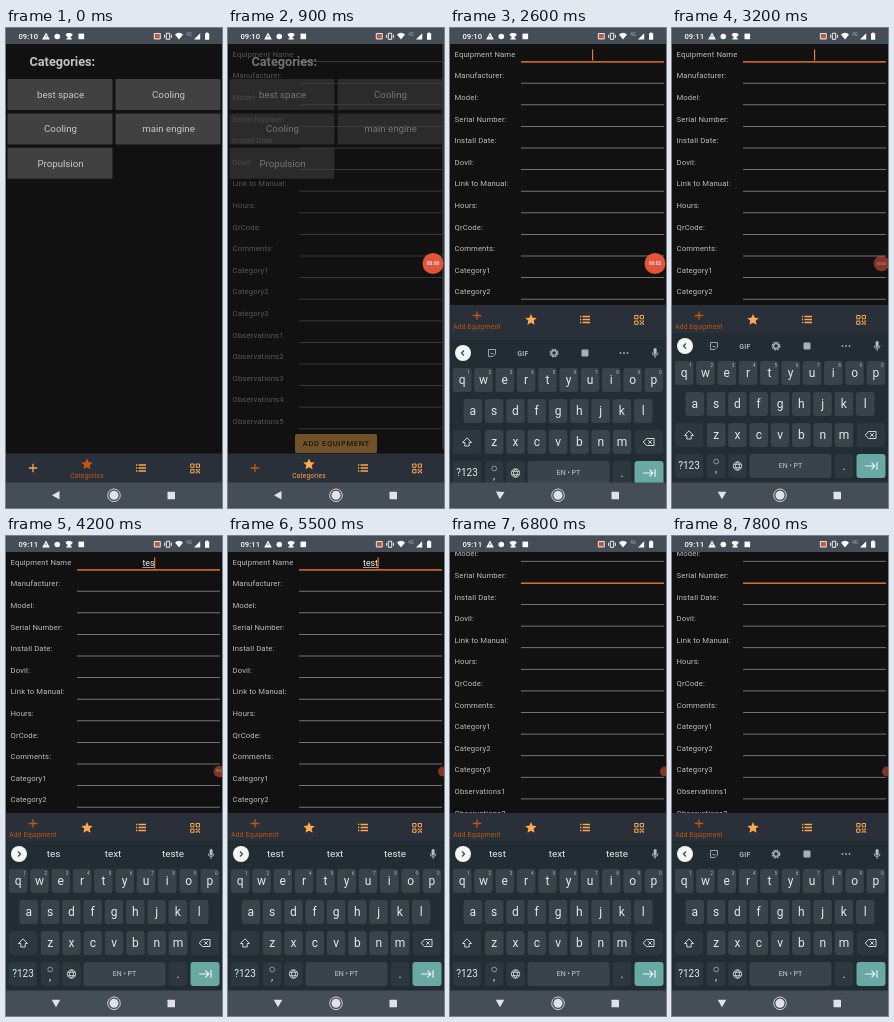
Animation, 216 px wide and 480 px high, one loop 8000 ms. Source, as an HTML page:

```html
<!DOCTYPE html>
<html lang="en">
<head>
<meta charset="utf-8">
<title>Equipment form</title>
<style>
html, body { margin: 0; width: 100%; height: 100%; overflow: hidden; background: #111; }
svg { display: block; width: 100vw; height: 100vh; font-family: Roboto, sans-serif; }
</style>
</head>
<body>
<svg id="stage" viewBox="0 0 216 480"></svg>
<script>
const LOOP = 8000, STEP = 100;
const BG = '#111', AMBER = '#ffa84d', RUST = '#c4560f', FOCUS = '#e87a35', BAR = '#454e56';
const ROW = 21.6, SCROLL_END = 51.5, KEYBOARD_SHIFT = 148.5;
const stage = document.getElementById('stage');

function add(parent, tag, attrs = {}, content) {
  const node = document.createElementNS('http://www.w3.org/2000/svg', tag);
  set(node, attrs);
  if (content !== undefined) node.textContent = content;
  parent.append(node);
  return node;
}
function set(node, attrs) {
  for (const name in attrs) node.setAttribute(name, attrs[name]);
}
const group = (parent = stage, attrs) => add(parent, 'g', attrs);
const rect = (parent, x, y, width, height, fill, rx = 0) =>
  add(parent, 'rect', { x, y, width, height, fill, rx });
const circle = (parent, cx, cy, r, fill) => add(parent, 'circle', { cx, cy, r, fill });
const fillPath = (parent, d, fill) => add(parent, 'path', { d, fill });
const linePath = (parent, d, stroke, width = 1) =>
  add(parent, 'path', { d, stroke, fill: 'none', 'stroke-width': width });
const text = (parent, x, y, size, fill, content, extra = {}) =>
  add(parent, 'text', { x, y, fill, 'font-size': size, ...extra }, content);
const centred = (parent, x, y, size, fill, content, extra = {}) =>
  text(parent, x, y, size, fill, content, { 'text-anchor': 'middle', ...extra });
const moveTo = (node, x, y) => set(node, { transform: `translate(${x} ${y})` });
const show = (node, visible) => set(node, { opacity: +visible });
const ramp = (t, from, to) => Math.min(1, Math.max(0, (t - from) / (to - from)));

rect(stage, 0, 0, 216, 480, BG);

// Equipment form
const form = group();
const sheet = group(form);
const labels = ['Equipment Name', 'Manufacturer:', 'Model:', 'Serial Number:', 'Install Date:',
  'Dovil:', 'Link to Manual:', 'Hours:', 'QrCode:', 'Comments:',
  ...[1, 2, 3].map(n => 'Category' + n), ...[1, 2, 3, 4, 5].map(n => 'Observations' + n)];
const underlines = labels.map((label, i) => {
  text(sheet, 4.5, 28.7 + i * ROW, 7.7, '#bdbdbd', label, { 'letter-spacing': .13 });
  return rect(sheet, 71, 33.2 + i * ROW, 143, .8, '#8c8c8c');
});
rect(sheet, 67, 406, 82, 19, '#ffb14f', 2);
centred(sheet, 108.3, 418.3, 7.7, '#2d2010', 'ADD EQUIPMENT', { 'font-weight': 500, 'letter-spacing': .55 });
const typed = centred(sheet, 142.5, 29.8, 8.8, '#f2f2f2', '');
const typedLine = rect(sheet, 135, 31, 0, .7, '#ddd');
const cursor = rect(sheet, 142, 21.5, 1.2, 11, FOCUS);
const scrollbar = rect(form, 214, 16, 2, 400, '#666');

// Category list
const categories = group();
text(categories, 23.5, 37.5, 12.7, '#c4c4c4', 'Categories:', { 'font-weight': 700 });
['best space', 'Cooling', 'Cooling', 'main engine', 'Propulsion'].forEach((name, i) => {
  const x = 1.5 + i % 2 * 108, y = 51 + Math.floor(i / 2) * 34.4;
  rect(categories, x, y, 105, 31, '#414141', 1);
  centred(categories, x + 53, y + 18.9, 9.7, '#c8c8c8', name);
});

// Tabs
const tabs = group();
rect(tabs, 0, 425.5, 216, 180, '#2a303a');
const plus = linePath(group(tabs), 'M22.8 440H31.2M27 435.8V444.2', AMBER, 1.3);
const star = fillPath(group(tabs),
  'M81 434.5l1.7 3.7 4 .4-3 2.7.9 4-3.6-2.1-3.6 2.1.9-4-3-2.7 4-.4z', AMBER);
linePath(tabs, 'M132.5 437H140M132.5 440H140M132.5 443H140', AMBER, 1.3);
linePath(tabs, 'M130 437h1.3M130 440h1.3M130 443h1.3', AMBER, 1.3);
linePath(tabs, 'M184.7 436h3.3v3.3h-3.3zM190.2 436h3.3v3.3h-3.3zM184.7 441.5h3.3v3.3h-3.3z', AMBER);
fillPath(tabs, 'M189.7 441h1.5v1.5h-1.5zM192.5 441h1.5v1.5h-1.5zM191.2 442.5h1.4v1.4h-1.4zM189.7 443.8h1.5v1.5h-1.5zM192.5 443.8h1.5v1.5h-1.5z', AMBER);
const tabLabel = (x, name) => centred(tabs, x, 449.6, 6.6, RUST, name, { 'letter-spacing': .2 });
const addLabel = tabLabel(27, 'Add Equipment');
const categoriesLabel = tabLabel(81, 'Categories');

// Keyboard
const INK = '#e4e9eb', KEY = '#39444a', FUNCTION_KEY = '#2c383e', PRESSED = '#566269';
const keyboard = group();
rect(keyboard, 0, 305, 216, 175, '#222d33');
circle(keyboard, 13, 318, 8, '#f4f6f6');
const chevron = linePath(keyboard, '', '#37444a', 1.2);
fillPath(keyboard, 'M203.6 314.4a1.5 1.5 0 0 1 3 0v3.6a1.5 1.5 0 0 1-3 0z', '#b4bfc4');
linePath(keyboard, 'M202.2 317.6a2.9 2.9 0 0 0 5.8 0M205.1 320.6v2.4', '#b4bfc4', .9);

const tools = group(keyboard);
const TOOL = '#a5b1b6';
linePath(tools, 'M38.5 314.5h7v4.5l-2.5 2.5h-4.5zM40.5 318.2q1.5 1.6 3 0', TOOL, .9);
centred(tools, 73, 320.5, 7, TOOL, 'GIF', { 'font-weight': 700, 'letter-spacing': .2 });
add(tools, 'circle', { cx: 104, cy: 318, r: 3.5, fill: 'none', stroke: TOOL,
  'stroke-width': 1.8, 'stroke-dasharray': '1.9 .85' });
add(tools, 'circle', { cx: 104, cy: 318, r: 2.4, fill: 'none', stroke: TOOL, 'stroke-width': 1.3 });
rect(tools, 131.5, 314.5, 7, 7, TOOL, 1);
[170.5, 174, 177.5].forEach(x => circle(tools, x, 318, .9, TOOL));

const suggestions = group(keyboard);
const words = [47.5, 107, 167].map(x => centred(suggestions, x, 321.3, 9.9, INK, ''));

const keys = {};
function addKey(label, cx, cy, width, fill = KEY, size = 12) {
  const key = rect(keyboard, cx - width / 2, cy - 12, width, 24, fill, 3);
  if (label) {
    keys[label] = key;
    centred(keyboard, cx, cy + size * .33, size, INK, label);
  }
}
[['qwertyuiop', 12.2, 345], ['asdfghjkl', 22.8, 376], ['zxcvbnm', 44.2, 407]].forEach(([row, x, y], r) =>
  [...row].forEach((letter, i) => {
    const cx = x + i * 21.3;
    addKey(letter, cx, y, 18.6);
    if (r === 0) centred(keyboard, cx + 6.3, y - 6.2, 4.6, '#b4bfc4', (i + 1) % 10);
  }));
addKey('', 17, 407, 28, FUNCTION_KEY);
linePath(keyboard, 'M17 402.8l-4.5 4.7h2.3v3.5h4.4v-3.5h2.3z', INK, .9);
addKey('', 199, 407, 28, FUNCTION_KEY);
linePath(keyboard, 'M196.5 403.5h7.5v7h-7.5l-3.2-3.5zM198.2 405.2l3.6 3.6M201.8 405.2l-3.6 3.6', INK, .9);
addKey('?123', 17, 438, 28, FUNCTION_KEY, 10);
addKey('', 44.2, 438, 18.6, FUNCTION_KEY);
add(keyboard, 'circle', { cx: 44.2, cy: 433.5, r: 2.4, fill: 'none', stroke: '#b4bfc4', 'stroke-width': .7 });
centred(keyboard, 44.2, 444, 11, INK, ',');
addKey('', 65.5, 438, 18.6, FUNCTION_KEY);
linePath(keyboard, 'M61.3 438a4.2 4.2 0 1 0 8.4 0a4.2 4.2 0 1 0-8.4 0M61.8 436.3h7.4M61.8 439.7h7.4M65.5 433.8q-4 4.2 0 8.4q4-4.2 0-8.4', INK, .8);
addKey('', 118.5, 438, 82);
centred(keyboard, 118.5, 440.4, 7, '#c3cdd1', 'EN • PT');
addKey('.', 172, 438, 18.6, FUNCTION_KEY);
addKey('', 199, 438, 29, '#6aa9a3');
linePath(keyboard, 'M193 438h9.5M199.5 434.7l3.3 3.3-3.3 3.3M205 434.3v7.4', '#eef6f5', 1.2);

// System bars
rect(stage, 0, 454.5, 216, 25.5, BAR);
const back = fillPath(stage, 'M46 467.3L53.5 463V471.6z', '#dfe3e5');
add(stage, 'circle', { cx: 108, cy: 467.3, r: 6.3, fill: 'none', stroke: '#dfe3e5', 'stroke-width': .9 });
circle(stage, 108, 467.3, 4.5, '#dfe3e5');
rect(stage, 161.5, 463.8, 7.5, 7.5, '#dfe3e5', .5);

rect(stage, 0, 0, 216, 16, BAR);
const clock = text(stage, 12.5, 11, 7.7, '#fff', '', { 'font-weight': 500 });
fillPath(stage, 'M40 4.5l3.8 7h-7.6z', '#fff');
rect(stage, 39.6, 7.2, .8, 2.3, BAR);
circle(stage, 51.3, 8.5, 2.8, '#fff');
fillPath(stage, 'M61 5h4.2v.8h1.4q0 2.8-2 3v1.5h1.2v1.2h-5.4v-1.2h1.2V8.8q-2-.2-2-3H61z', '#fff');
rect(stage, 72.5, 5.6, 5.6, 5.6, '#fff');
rect(stage, 147.8, 5, 7, 6.4, '#e9dedb', .8);
rect(stage, 148.8, 6, 5, 4.4, '#b45a4b');
linePath(stage, 'M160.3 5.3h3.4v6h-3.4zM158.6 6.7v3.2M165.4 6.7v3.2', '#fff', .9);
fillPath(stage, 'M169 6.5q4-3.3 8 0l-4 5z', '#fff');
centred(stage, 183, 8.2, 4.6, '#a9b0b5', '4G');
fillPath(stage, 'M188 11.5h6.2V5.2z', '#fff');
fillPath(stage, 'M199 5.3h1.2v-.9h1.8v.9h1.2v6.5H199z', '#fff');

// Floating timer
const bubble = group();
circle(bubble, 0, 0, 10.5, '#e5533a');
const timer = centred(bubble, 0, 1.7, 5, '#fff', '', { 'font-weight': 500 });

function typedAt(t) {
  return 'test'.slice(0, t < 3700 ? 0 : Math.min(4, Math.floor((t - 3700) / 200) + 1));
}

function cursorVisible(t) {
  if (t < 2300) return false;
  if (t < 5900) return t < 4900 || t >= 5400;
  return t >= 7300 && t < 7800;
}

function drawForm(t, keyboardUp) {
  const scroll = SCROLL_END * (1 - (1 - ramp(t, 5800, 6400)) ** 2.6);
  const offset = t < 5900 ? 0 : scroll;
  const onSerial = t >= 6800;
  const focused = onSerial ? 3 : t >= 2200 ? 0 : -1;
  const word = typedAt(t);
  show(form, 1);
  set(form, { opacity: ramp(t, 740, 1140) });
  moveTo(sheet, 0, -offset);
  underlines.forEach((line, i) => set(line, i === focused
    ? { fill: FOCUS, height: 1.4 } : { fill: '#8c8c8c', height: .8 }));

  const width = [0, 2.9, 7.5, 12.1, 15][word.length];
  typed.textContent = word;
  set(typedLine, { x: 142.5 - width / 2, width: onSerial ? 0 : width });
  set(cursor, { x: onSerial ? 142 : 142 + width / 2, y: 21.5 + (onSerial ? 3 * ROW : 0) });
  show(cursor, cursorVisible(t));

  const view = keyboardUp ? 261 : 409, content = 412.5;
  set(scrollbar, { y: 16 + offset * view / content, height: view * view / content });
  show(scrollbar, t < 2500 || (t >= 5900 && t < 6800));
}

function drawTabs(t, keyboardUp) {
  const change = ramp(t, 900, 1200), switched = t >= 800;
  moveTo(tabs, 0, keyboardUp ? -KEYBOARD_SHIFT : 0);
  moveTo(plus.parentNode, 0, -4 * change);
  moveTo(star.parentNode, 0, -4 * (1 - change));
  set(plus, { stroke: switched ? RUST : AMBER });
  set(star, { fill: switched ? AMBER : RUST });
  set(addLabel, { opacity: change });
  set(categoriesLabel, { opacity: 1 - change, fill: switched ? AMBER : RUST });
}

function drawKeyboard(t) {
  const rise = 1 - (1 - ramp(t, 2200, 2700)) ** 2;
  const suggesting = t >= 3700 && t < 7200;
  const word = typedAt(t);
  moveTo(keyboard, 0, 175 * (1 - rise));
  show(keyboard, rise > 0);
  set(back, { transform: `rotate(${-90 * rise} 50 467.3)` });
  show(tools, !suggesting);
  show(suggestions, suggesting);
  set(chevron, { d: suggesting ? 'M12 315.5l2.5 2.5-2.5 2.5' : 'M14 315.5l-2.5 2.5 2.5 2.5' });
  [word, 'text', 'teste'].forEach((w, i) => words[i].textContent = w);
  const pressed = t >= 3700 && t < 4400 && (t - 3700) % 200 < 100 ? word.at(-1) : '';
  for (const letter of 'tes') set(keys[letter], { fill: letter === pressed ? PRESSED : KEY });
}

function drawBubble(t) {
  const dim = ramp(t, 2900, 3200), tuck = ramp(t, 3700, 4400);
  const x = 205 + 4.5 * dim + 5.5 * tuck, scale = 1 - .26 * dim - .26 * tuck;
  set(bubble, { transform: `translate(${x} 235.5) scale(${scale})`,
    opacity: ramp(t, 0, 300) * (1 - .45 * dim) });
  timer.textContent = '00:0' + Math.max(0, Math.floor((t - 100) / 1000));
  show(timer, tuck < 1);
}

function draw(t) {
  const keyboardUp = t >= 2500;
  clock.textContent = t < 3100 ? '09:10' : '09:11';
  set(categories, { opacity: 1 - ramp(t, 800, 1020) });
  drawForm(t, keyboardUp);
  drawTabs(t, keyboardUp);
  drawKeyboard(t);
  drawBubble(t);
}

const start = performance.now();
function tick() {
  const t = (performance.now() - start) % LOOP;
  draw(Math.floor(t / STEP) * STEP);
  requestAnimationFrame(tick);
}
tick();
</script>
</body>
</html>
```
